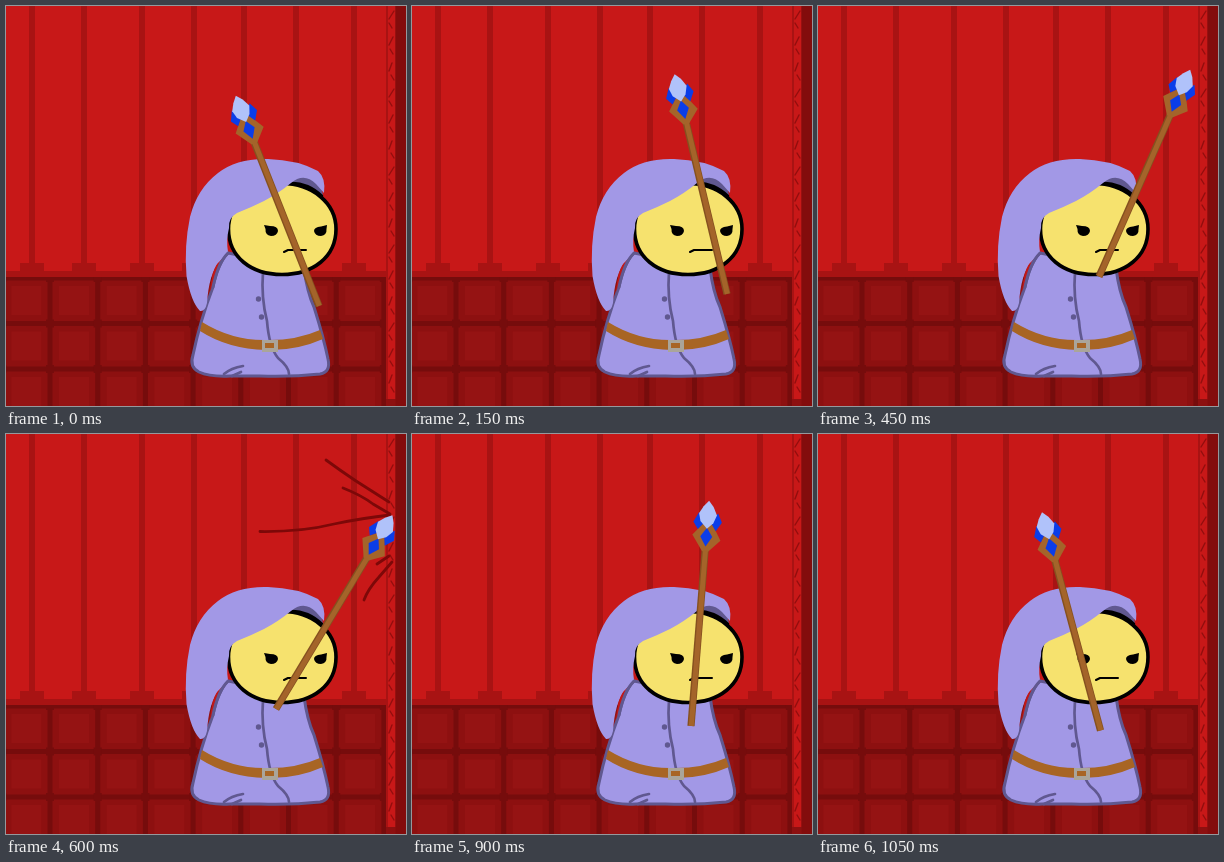
An HTML page with a canvas for the animation above (1200 ms loop, 400 by 400 pixels).

```html
<!DOCTYPE html>
<html lang="en">
<head>
<meta charset="utf-8">
<title>Staff swing</title>
<style>
html, body { margin: 0; width: 100%; height: 100%; overflow: hidden; background: #c81818; }
canvas { display: block; width: 400px; height: 400px; }
</style>
</head>
<body>
<canvas id="stage" width="400" height="400"></canvas>
<script>
const ctx = document.getElementById('stage').getContext('2d');
const STEP = 150;
const HIT = 4;

// Foot of the staff (x, y) and its lean in degrees, one pose per step.
const POSES = [
  [313, 300, -21.6], [315, 288, -13.4], [299, 276, 9.7], [281, 270.5, 23.8],
  [270, 275, 31], [272.7, 282, 20], [279, 292, 4.6], [282.5, 296.5, -15]
];

const LILAC = '#a298e6', SEAM = '#605890', BROWN = '#a4642a';
const GROUT = '#760c0c', SHADE = '#a81313', BLUE = '#0b3de8';

function rect(color, x, y, w, h) {
  ctx.fillStyle = color;
  ctx.fillRect(x, y, w, h);
}

function shape(d, fill, stroke, width = 3) {
  const p = new Path2D(d);
  if (fill) { ctx.fillStyle = fill; ctx.fill(p); }
  if (stroke) {
    ctx.strokeStyle = stroke;
    ctx.lineWidth = width;
    ctx.lineCap = ctx.lineJoin = 'round';
    ctx.stroke(p);
  }
}

function dot(x, y, r, color) {
  ctx.fillStyle = color;
  ctx.beginPath();
  ctx.arc(x, y, r, 0, 7);
  ctx.fill();
}

function drawTiles() {
  const w = 47.7, h = 45.5, left = -3.7, top = 272;
  rect('#8d1010', 0, 271, 381, 129);
  for (let x = left; x < 340; x += w) {
    for (let y = top; y < 400; y += h) rect('#951313', x + 9, y + 8, 30, 29);
  }
  for (let y = top; y < 400; y += h) rect(GROUT, 0, y - 2.5, 381, 5);
  for (let x = left; x < 381; x += w) {
    rect(GROUT, x - 2.5, 271, 5, 129);
    for (let y = top; y < 400; y += h) rect(GROUT, x - 4, y - 4, 8, 8);
  }
}

function drawPillar() {
  rect('#8d1010', 380, 0, 20, 400);
  rect('#c81818', 382, 0, 7.5, 393);
  rect(SHADE, 380, 0, 2, 393);
  rect('#830c0c', 389.5, 0, 10.5, 400);
  for (let i = 0; i < 15; i++) {
    const y = 5 + i * 26, k = i % 3;
    shape(`M${388 - k} ${y} l${k - 5} 8 M${383 + k} ${y + 12} l3 5`, null, '#920e0e', 1.4);
  }
}

function drawRoom() {
  rect('#c81818', 0, 0, 400, 400);
  for (const x of [23, 75, 133, 185, 235, 287, 345]) {
    rect(SHADE, x, 0, 6, 258);
    rect(SHADE, x - 9, 257, 24, 9);
  }
  drawTiles();
  rect(SHADE, 0, 265, 381, 6);
  drawPillar();
}

function drawRobe() {
  shape('M222 247 Q212 257 207 281 Q194 315 187 349 Q183 361 193 366 Q204 371 224 370 L254 370 Q286 371 314 368 ' +
    'Q325 366 322 353 Q318 333 308 301 Q301 286 298 262 Z', LILAC, SEAM);
  shape('M257 266 Q255 292 261 315 Q263 341 272 352 Q283 361 283 368 M218 368 Q225 362 237 360 M226 370 L235 366',
    null, SEAM, 2.7);
  dot(252.5, 293, 2.7, SEAM);
  dot(255.5, 311, 2.7, SEAM);
  shape('M196 316 Q225 334 258 334 Q289 335 314 324 L317 333 Q290 345 260 344 Q222 343 194 325 Z', '#a86524');
  rect('#aaa59a', 256, 334, 16, 12);
  rect('#a86524', 259, 337, 9, 5);
}

function drawHead() {
  shape('M282 178 Q296 164 313 172 L317 189 Z', SEAM);
  shape('M222.5 223 C222.5 197 246 177.5 276 177.5 C306 177.5 330 197 330 223 ' +
    'C330 251 307 268.5 276 268.5 C245 268.5 222.5 251 222.5 223 Z', '#f6e26e', '#000', 3.6);
  shape('M285 177 Q303 177 316 190', null, '#000', 2.5);

  // Hood
  shape('M318 187 Q320 172 312 165 Q292 154 262 153 Q231 152 212 167 Q191 183 184 211 Q178 240 180.5 270 ' +
    'Q185 296 194 305 Q199 306 201 297 Q203 268 213 256 L222 246 Q220 234 223 222 Q222 212 231 207 ' +
    'Q246 201 258 195 Q273 187 285 177 Q298 166 310 178 Z', LILAC);
  shape('M213 256 Q206 262 204 286 Q209 272 213 256 Z', '#c01818');
  shape('M222 247 Q212 257 207 281', null, SEAM);

  // Face
  shape('M258 219 L264 220 Q272 220 272 225 Q271 230 265 230 Q259 229 259.5 223 Z', '#000');
  shape('M321 219 L315 220.5 Q308 221 308 225 Q309 230 315 230 Q321 229 320.5 223 Z', '#000');
  shape('M278 246 L282 244 L300 244', null, '#000', 2);
}

function drawImpact() {
  shape('M320 26 Q335 37 350 47 L383 68 M337 54 Q355 61 367 70 L384 80 ' +
    'M254 97.5 Q296 98 328 90 Q357 84 384 81 M358 166 Q362 155 373 143 L386 128 M371 130 L383 122',
    null, '#7d0808', 2.8);
}

// Drawn upright with its foot at the origin.
function drawStaff([x, y, lean]) {
  ctx.save();
  ctx.translate(x, y);
  ctx.rotate(lean * Math.PI / 180);
  rect('#85501f', -3.6, -177, 7.2, 177);
  rect(BROWN, -2.2, -177, 5, 177);
  shape('M-3 -175 L-14 -191 L-4 -203 L5 -203 L14.5 -187 L3 -175 Z', BROWN);
  shape('M0 -180 L-6 -190 L0 -199 L6 -190 Z', BLUE);
  shape('M-9 -197 L-14 -204 L-9 -214 L-3 -204 Z', BLUE);
  shape('M9 -196 L14.5 -205 L10 -214 L3 -205 Z', BLUE);
  shape('M0 -198 L-7 -205 L-9 -213 L-5 -220 L0 -226 L5 -220 L9 -212 L6 -204 Z', '#b0c2fa');
  ctx.restore();
}

function frame(now) {
  const step = Math.floor(now / STEP) % POSES.length;
  drawRoom();
  drawRobe();
  drawHead();
  if (step === HIT) drawImpact();
  drawStaff(POSES[step]);
}

const start = performance.now();
function tick() {
  frame(performance.now() - start);
  requestAnimationFrame(tick);
}
tick();
</script>
</body>
</html>
```
